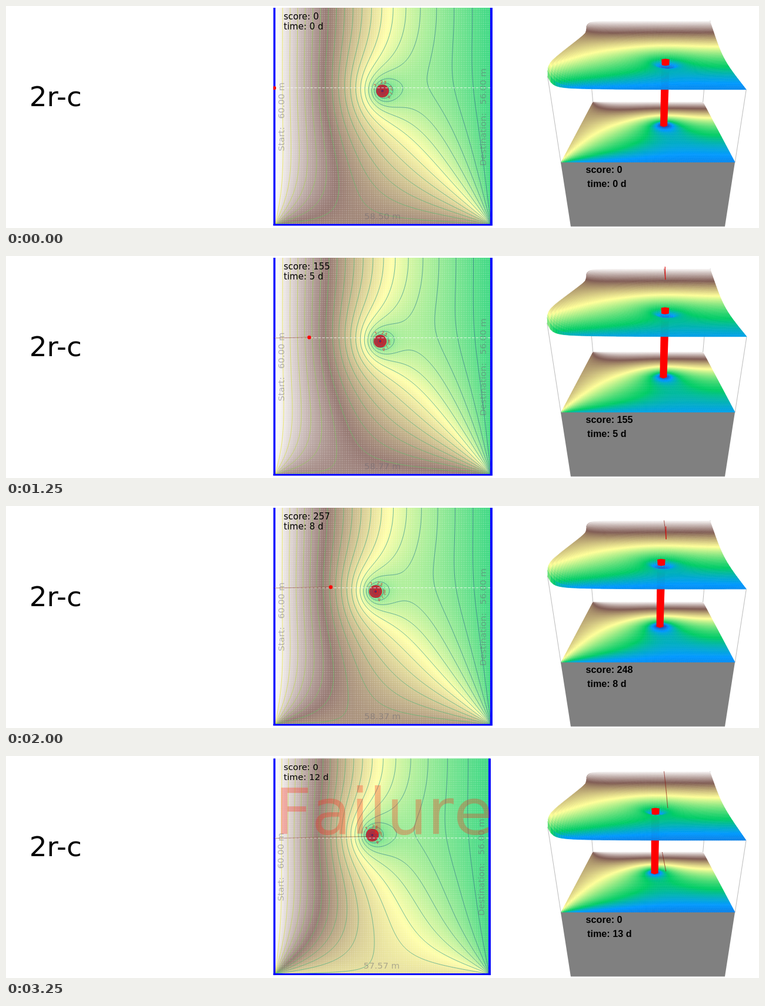
These frames come from a looping animation (1280x379 px, 3500 ms). An HTML page with a canvas:

```html
<!DOCTYPE html>
<html lang="en">
<head>
<meta charset="utf-8">
<title>Groundwater game</title>
<style>
  html, body { margin: 0; width: 100%; height: 100%; overflow: hidden; background: #fff; }
  canvas { display: block; }
</style>
</head>
<body>
<canvas id="stage" width="1280" height="379"></canvas>
<script>
const STEP_MS = 250, STEPS = 14, FAIL_STEP = 12;
const W = 367, H = 370, LEFT = 457.5, TOP = 3;
const K = Math.PI / W;
const CELL = 2, COLS = 185, ROWS = 186;

// step, map score, 3D score, bottom head, map well x, y, particle x, y, 3D well x, y, front edge y in 3D
const KEYS = [
  [0, 0, 0, 58.50, 640, 145, 456, 140, 640, 144.5, 143],
  [3, 92, 92, 58.45, 638.5, 131, 492, 139.5, 641, 146, 140],
  [5, 155, 155, 58.77, 636, 145.5, 515.5, 139, 648.5, 146, 138],
  [7, 221, 216, 58.42, 627.5, 153, 539, 139, 643, 149.5, 143],
  [9, 293, 279, 58.31, 629, 139, 565, 138, 648, 161, 141.5],
  [11, 393, 351, 57.72, 627, 142.5, 602, 139, 630, 165.5, 144],
  [13, 440, 390, 57.57, 624, 134.5, 614, 137, 622, 169, 144.5],
];
const TERRAIN = [[0, 51, 51, 153], [.15, 0, 153, 255], [.25, 0, 204, 102],
  [.5, 255, 255, 153], [.75, 128, 92, 84], [1, 255, 255, 255]];
const VIRIDIS = [[0, 68, 1, 84], [.25, 59, 82, 139], [.5, 33, 145, 140],
  [.75, 94, 201, 98], [1, 253, 231, 37]];

function ramp(table, t) {
  t = Math.min(Math.max(t, table[0][0]), table[table.length - 1][0]);
  const i = Math.max(1, table.findIndex(row => row[0] >= t));
  const a = table[i - 1], b = table[i], f = (t - a[0]) / (b[0] - a[0]);
  return a.slice(1).map((v, j) => v + (b[j + 1] - v) * f);
}
const rgb = c => `rgb(${c.map(Math.round).join()})`;

function stateAt(step) {
  const [score, score3d, hb, wellX, wellY, px, py, well3dX, well3dY, frontY] = ramp(KEYS, step);
  const failed = step >= FAIL_STEP;
  return { step, failed, hb, wellX, wellY, px, py, well3dX, well3dY,
    score: failed ? 0 : Math.round(score), score3d: failed ? 0 : Math.round(score3d),
    lift: (143 - frontY) / 140, frontTone: .12 + (143 - frontY) * .008 };
}

// Steady flow: heads fixed at left, right and bottom, closed top, one pumping well with mirror images.
function headField({ wellX, wellY, bottom, fall = 0, pump, radius }) {
  const x0 = wellX - LEFT, y0 = wellY - TOP;
  const images = [[y0, 1], [-y0, 1], [2 * H - y0, -1], [2 * H + y0, -1]];
  const floor = (K * radius) ** 2 / 2;
  return (x, y) => {
    x = Math.max(x, 1e-9);
    const edge = d => {
      const q = Math.exp(-2 * K * d), a = 2 * K * x;
      return (bottom - 58) * 2 / Math.PI * Math.atan2(Math.sin(K * x), Math.sinh(K * d))
        - (4 - fall) / Math.PI * Math.atan2(q * Math.sin(a), 1 - q * Math.cos(a));
    };
    let h = 60 - 4 * x / W + edge(Math.max(H - y, 0)) + edge(H + y);
    const near = Math.cos(K * (x - x0)), far = Math.cos(K * (x + x0));
    for (const [yi, sign] of images) {
      const c = Math.cosh(K * (y - yi));
      h += sign * pump * Math.log(Math.max(c - near, floor) / Math.max(c - far, floor));
    }
    return h;
  };
}

const tone = (h, front) => front + (h - 56) / 4 * (1 - front);

function newCanvas(w, h) {
  const c = document.createElement('canvas');
  c.width = w; c.height = h;
  return c;
}

function text(g, str, x, y, font, color = '#000') {
  g.font = font; g.fillStyle = color;
  g.fillText(str, x, y);
}
const sans = size => `${size}px "DejaVu Sans", sans-serif`;
const FAINT = 'rgba(105,105,115,.48)';

function disc(g, x, y, r, color) {
  g.fillStyle = color;
  g.beginPath(); g.arc(x, y, r, 0, 7); g.fill();
}

function line(g, points, color, width = 1) {
  g.strokeStyle = color; g.lineWidth = width;
  g.beginPath();
  points.forEach(p => g.lineTo(...p));
  g.stroke();
}

function polygon(g, points, color) {
  g.fillStyle = color;
  g.beginPath();
  points.forEach(p => g.lineTo(...p));
  g.fill();
}

function drawHeat(g, grid) {
  const c = newCanvas(COLS, ROWS), cg = c.getContext('2d');
  const img = cg.createImageData(COLS, ROWS);
  grid.forEach((h, i) => img.data.set([...ramp(TERRAIN, tone(h, .27)), 255], i * 4));
  cg.putImageData(img, 0, 0);
  const paint = alpha => {
    g.globalAlpha = alpha;
    g.drawImage(c, -1, -1, COLS * CELL, ROWS * CELL);
    g.globalAlpha = 1;
  };
  paint(.72);
  g.save();
  g.beginPath();
  for (let p = 0; p < H; p += 3.7) {
    g.rect(Math.round(p) + .5, 0, 1, H);
    g.rect(0, Math.round(p), W, 1);
  }
  g.clip();
  paint(.45);
  g.restore();
}

function drawContours(g, grid) {
  const paths = new Map();
  for (let j = 0; j < ROWS - 1; j++) for (let i = 0; i < COLS - 1; i++) {
    const n = j * COLS + i;
    const v = [grid[n], grid[n + 1], grid[n + COLS + 1], grid[n + COLS]];
    const corners = [[i, j], [i + 1, j], [i + 1, j + 1], [i, j + 1]];
    const last = Math.floor(Math.max(...v) * 5);
    for (let level = Math.ceil(Math.min(...v) * 5); level <= last; level++) {
      const cuts = [];
      for (let e = 0; e < 4; e++) {
        const b = (e + 1) % 4, h = level / 5;
        if ((v[e] < h) === (v[b] < h)) continue;
        const f = (h - v[e]) / (v[b] - v[e]);
        cuts.push([0, 1].map(a => CELL * (corners[e][a] + (corners[b][a] - corners[e][a]) * f)));
      }
      if (!paths.has(level)) paths.set(level, new Path2D());
      for (let m = 0; m + 1 < cuts.length; m += 2) {
        paths.get(level).moveTo(...cuts[m]);
        paths.get(level).lineTo(...cuts[m + 1]);
      }
    }
  }
  g.lineWidth = 1;
  g.globalAlpha = .65;
  for (const [level, path] of paths) {
    g.strokeStyle = rgb(ramp(VIRIDIS, (level / 5 - 54.4) / 5.6));
    g.stroke(path);
  }
  g.globalAlpha = 1;
}

function drawWellLabel(g, s) {
  [...'-7.25 m³/d'].forEach((ch, i) => {
    g.save();
    g.translate(s.wellX, s.wellY);
    g.rotate(-1.3 + i * .4 + (s.step % 3) * .2);
    text(g, ch, -2, -13, sans(6.5), '#e02020');
    g.restore();
  });
}

function drawSideLabel(g, str, x, y) {
  g.save();
  g.translate(x, y);
  g.rotate(-Math.PI / 2);
  text(g, str, 0, 0, sans(14.9), FAINT);
  g.restore();
}

function drawMap(g, s) {
  const head = headField({ wellX: s.wellX, wellY: s.wellY, bottom: s.hb, pump: .28, radius: 4 });
  const grid = new Float32Array(COLS * ROWS);
  grid.forEach((_, n) => grid[n] = head(n % COLS * CELL, Math.floor(n / COLS) * CELL));

  g.save();
  if (s.failed) {
    g.translate(LEFT, 4.3);
    g.scale(.992, .994);
    g.translate(-LEFT, -TOP);
  }
  g.save();
  g.translate(LEFT, TOP);
  g.beginPath(); g.rect(0, 0, W, H); g.clip();
  drawHeat(g, grid);
  g.restore();

  disc(g, s.wellX, s.wellY, 11, 'rgba(222,18,28,.9)');
  g.save();
  g.translate(LEFT, TOP);
  drawContours(g, grid);
  g.restore();
  disc(g, s.wellX, s.wellY, 2.2, 'rgba(60,40,110,.7)');
  drawWellLabel(g, s);

  g.fillStyle = '#00f';
  g.fillRect(454.5, TOP, 3.5, 372);
  g.fillRect(823, TOP, 4, 372);
  g.fillRect(454.5, 372, 372.5, 3);

  g.setLineDash([4.5, 2.2]);
  line(g, [[457, 139.6], [825, 139.6]], 'rgba(255,255,255,.65)', 1.3);
  g.setLineDash([]);
  line(g, [[456, 140], [s.px, s.py]], 'rgba(120,45,25,.55)');
  if (!s.failed) {
    g.save();
    g.beginPath(); g.rect(454.5, 0, 373, 379); g.clip();
    disc(g, s.px, s.py, 3.2, '#f00');
    g.restore();
  }

  drawSideLabel(g, 'Start:\u00a0\u00a0\u00a060.00 m', 472.5, 248);
  drawSideLabel(g, 'Destination:\u00a0\u00a0\u00a056.00 m', 816, 273);
  text(g, s.hb.toFixed(2) + ' m', 609, 364, sans(14.9), FAINT);
  const drop = s.step ? .5 : 0;
  text(g, 'score: ' + s.score, 472, 22.5 + drop, sans(15));
  text(g, `time: ${Math.min(s.step, 12)} d`, 472, 39.5 + drop, sans(15));
  g.restore();
  if (s.failed) {
    g.fontKerning = 'none';
    text(g, 'Failure', 457, 133, sans(109), 'rgba(255,40,20,.3)');
    g.fontKerning = 'auto';
  }
}

// u runs left to right, v back to front, z upwards.
function project(u, v, z) {
  const w = 1 + .583 * (1 - v) - .114 * z;
  return [1091.2 + (2 * u - 1) * 148 / w, (267 - 7.4 * (1 - v) - 140.3 * z) / w];
}

// Heads are taken at cell centres, so the outermost samples lie a little inside the edges.
function drawSurface(g, s, head, height) {
  const N = 90, INSET = 4, h = [];
  const sample = (i, size) => INSET + (size - 2 * INSET) * i / N;
  for (let j = 0; j <= N; j++) {
    h.push([]);
    for (let i = 0; i <= N; i++) h[j].push(head(sample(j, W), sample(N - i, H)));
  }
  const node = (i, j) => project(i / N, j / N, height(h[j][i]));
  g.lineWidth = .7;
  for (let j = 0; j < N; j++) for (let i = 0; i < N; i++) {
    const mean = (h[j][i] + h[j][i + 1] + h[j + 1][i] + h[j + 1][i + 1]) / 4;
    const color = rgb(ramp(TERRAIN, tone(mean, s.frontTone)));
    polygon(g, [node(i, j), node(i + 1, j), node(i + 1, j + 1), node(i, j + 1)], color);
    g.strokeStyle = color;
    g.stroke();
  }
}

function drawView(g, s) {
  const head = headField({ wellX: s.well3dX, wellY: s.well3dY, bottom: 58.3, fall: .5, pump: .38, radius: 12 });
  const height = h => 1 + s.lift + .15 * (h - 56);
  const place = (x, y, z) => project(1 - (y - TOP) / H, (x - LEFT) / W, z);
  const trail = toZ => Array.from({ length: 25 }, (_, i) => {
    const x = LEFT + (s.px - LEFT) * i / 24, y = 140 + (s.py - 140) * i / 24;
    return place(x, y, toZ(head(x - LEFT, y - TOP)));
  });

  drawSurface(g, s, head, () => 0);
  polygon(g, [[943, 267], [1239, 267], [1222, 376.5], [960, 376.5]], '#808080');
  for (const [u, v, h] of [[0, 0, 58.5], [1, 0, 60], [0, 1, 57.1], [1, 1, 56]]) {
    line(g, [project(u, v, 0), project(u, v, height(h))], '#b4b4b4', .9);
  }
  if (s.step >= 9) {
    const low = trail(() => 0), end = low[low.length - 1];
    line(g, low, 'rgba(130,30,20,.8)');
    if (!s.failed) line(g, [[end[0] + .6, 140], end], 'rgba(140,20,20,.85)');
  }

  const [bx, by] = place(s.well3dX, s.well3dY, 0);
  const [tx, ty] = place(s.well3dX, s.well3dY, 1.03 + s.lift);
  polygon(g, [[tx - 7, ty], [tx + 7, ty], [bx + 6, by + 1], [bx, by + 3], [bx - 6, by + 1]], '#f00');

  drawSurface(g, s, head, height);

  if (s.step) {
    const path = trail(height), [x, y] = path[path.length - 1];
    line(g, path, 'rgba(140,30,20,.75)');
    if (!s.failed) line(g, [[x - .5, y - 22], [x, y]], '#e01010', 1.2);
  }
  polygon(g, [[tx - 6.5, ty - 10], [tx, ty - 11], [tx + 7, ty - 10], [tx + 6.5, ty], [tx, ty + 1], [tx - 6, ty]], '#f00');

  const bold = 'bold 16.2px "Liberation Sans", Arial, sans-serif';
  text(g, 'score: ' + s.score3d, 985.5, 285, bold);
  text(g, `time: ${s.step} d`, 988, 309, bold);
}

function render(step) {
  const c = newCanvas(1280, 379), g = c.getContext('2d');
  const s = stateAt(step);
  g.fillStyle = '#fff';
  g.fillRect(0, 0, 1280, 379);
  text(g, '2r-c', 39.7, 171, sans(47));
  drawMap(g, s);
  drawView(g, s);
  return c;
}

const stage = document.getElementById('stage').getContext('2d');
const pictures = [];
const start = performance.now();
let shown = -1;

function tick() {
  const step = Math.floor((performance.now() - start) / STEP_MS) % STEPS;
  if (step !== shown) {
    pictures[step] ??= render(step);
    stage.drawImage(pictures[step], 0, 0);
    shown = step;
  }
  requestAnimationFrame(tick);
}
tick();
</script>
</body>
</html>
```
